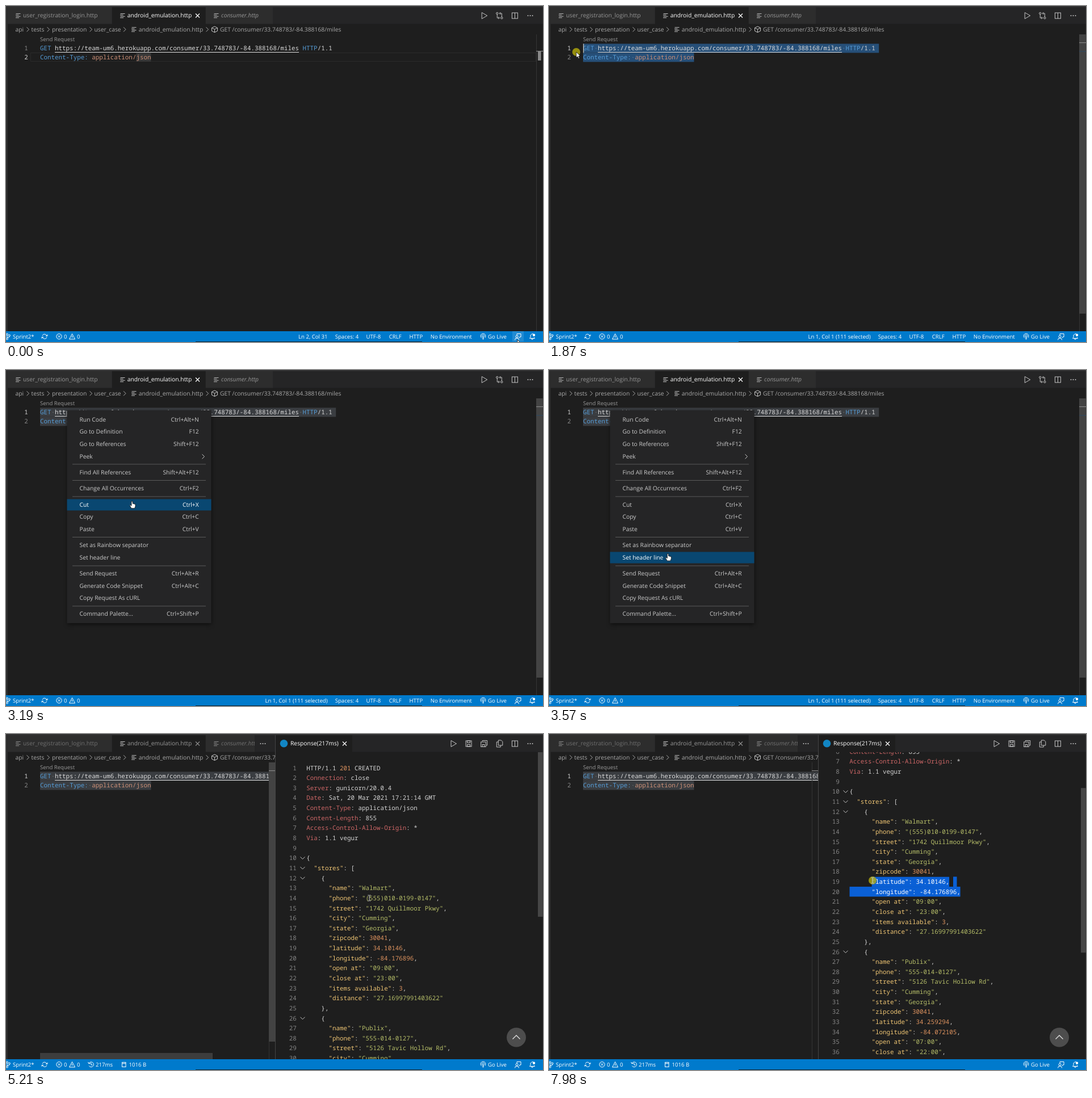
Animation, 946 px wide and 592 px high, one loop 8 s. Source, as an HTML page with a canvas:

```html
<!DOCTYPE html>
<html lang="en">
<head>
<meta charset="utf-8">
<title>HTTP request in an editor</title>
<style>
html, body { margin: 0; width: 100%; height: 100%; overflow: hidden; background: #1e1e1e; }
canvas { display: block; width: 946px; height: 592px; }
</style>
</head>
<body>
<canvas id="stage" width="946" height="592"></canvas>
<script>
const ctx = document.getElementById('stage').getContext('2d');
const LOOP = 8000;
const UI = '"Open Sans", "Noto Sans", sans-serif';
const MONO = '"Noto Sans Mono", "DejaVu Sans Mono", monospace';
const CW = 6.515, ROW = 17.64, CODE_X = 60, RESP_X = 529.3;
const DRAG = 1200, MENU = 2650, CLOSE = 3960, SPLIT = 4110, DONE = 4350, BODY = 4500, DRAG2 = 7150;

// pointer path: time, x, y
const PATH = [
  [0, 901, 588], [70, 901, 588], [250, 824, 536], [450, 676, 422], [650, 400, 205], [860, 96, 92],
  [1150, 262, 92], [1200, 262, 92], [1700, 78, 89], [1790, 56, 81], [1870, 48, 81], [2200, 48, 81],
  [2600, 108, 72], [2900, 108, 72], [3190, 222, 231], [3700, 205, 355], [3970, 205, 355],
  [4190, 335, 321], [4350, 416, 294], [4680, 418, 294], [5100, 640, 289], [5250, 640, 289],
  [5530, 640, 238], [6080, 638, 174], [6400, 624, 157], [6480, 625, 156], [6720, 683, 156],
  [6870, 683, 160], [7110, 727, 278], [7150, 727, 278], [7420, 650, 277], [7660, 600, 259],
  [7940, 570, 258], [8000, 570, 258]
];

const REQUEST = [
  [['GET', '#569cd6'], [' ', ''],
   ['https://team-um6.herokuapp.com/consumer/33.748783/-84.388168/miles', '#dcdcdc'],
   [' ', ''], ['HTTP', '#569cd6'], ['/1.1', '#d4d4d4']],
  [['Content-Type:', '#569cd6'], [' ', ''], ['application/json', '#ce9178']]
];
const LENGTHS = [79, 30];

const RESPONSE = `HTTP/1.1 201 CREATED
Connection: close
Server: gunicorn/20.0.4
Date: Sat, 20 Mar 2021 17:21:14 GMT
Content-Type: application/json
Content-Length: 855
Access-Control-Allow-Origin: *
Via: 1.1 vegur

{
  "stores": [
    {
      "name": "Walmart",
      "phone": "(555)010-0199-0147",
      "street": "1742 Quillmoor Pkwy",
      "city": "Cumming",
      "state": "Georgia",
      "zipcode": 30041,
      "latitude": 34.10146,
      "longitude": -84.176896,
      "open at": "09:00",
      "close at": "23:00",
      "items available": 3,
      "distance": "27.16997991403622"
    },
    {
      "name": "Publix",
      "phone": "555-014-0127",
      "street": "5126 Tavic Hollow Rd",
      "city": "Cumming",
      "state": "Georgia",
      "zipcode": 30041,
      "latitude": 34.259294,
      "longitude": -84.072105,
      "open at": "07:00",
      "close at": "22:00",`.split('\n');

const MENU_ITEMS = [
  [88, 'Run Code', 'Ctrl+Alt+N'], [109, 'Go to Definition', 'F12'], [131, 'Go to References', 'Shift+F12'],
  [153, 'Peek', ''], [181, 'Find All References', 'Shift+Alt+F12'], [209, 'Change All Occurrences', 'Ctrl+F2'],
  [238, 'Cut', 'Ctrl+X'], [259, 'Copy', 'Ctrl+C'], [281, 'Paste', 'Ctrl+V'],
  [309, 'Set as Rainbow separator', ''], [331, 'Set header line', ''],
  [359, 'Send Request', 'Ctrl+Alt+R'], [381, 'Generate Code Snippet', 'Ctrl+Alt+C'],
  [402, 'Copy Request As cURL', ''], [430, 'Command Palette...', 'Ctrl+Shift+P']
];
const MENU_RULES = [166, 194.5, 223, 294.5, 345, 416];

const clamp = (v, a = 0, b = 1) => Math.min(b, Math.max(a, v));
const ease = v => { v = clamp(v); return v * v * (3 - 2 * v); };

function rect(x, y, w, h, color) {
  ctx.fillStyle = color;
  ctx.fillRect(x, y, w, h);
}

// y is the middle of the capitals
function text(s, x, y, color, { size = 10.3, font = UI, align = 'left', style = '' } = {}) {
  ctx.font = `${style} ${size}px ${font}`;
  ctx.textAlign = align;
  ctx.fillStyle = color;
  ctx.fillText(s, x, y + size * 0.357);
}
const mono = (s, x, y, color, align) => text(s, x, y, color, { size: 10.86, font: MONO, align });

function line(points, color, width = 1, close = false) {
  ctx.beginPath();
  points.forEach(([x, y]) => ctx.lineTo(x, y));
  if (close) ctx.closePath();
  ctx.strokeStyle = color;
  ctx.lineWidth = width;
  ctx.stroke();
}

function disc(x, y, r, color) {
  ctx.beginPath();
  ctx.arc(x, y, r, 0, 7);
  ctx.fillStyle = color;
  ctx.fill();
}

function ring(x, y, r, color, from = 0, to = Math.PI * 2, width = 1) {
  ctx.beginPath();
  ctx.arc(x, y, r, from, to);
  ctx.strokeStyle = color;
  ctx.lineWidth = width;
  ctx.stroke();
}

function box(x, y, w, h, color) {
  ctx.strokeStyle = color;
  ctx.lineWidth = 1;
  ctx.strokeRect(x, y, w, h);
}

function clipped(x, y, w, h, draw) {
  ctx.save();
  ctx.beginPath();
  ctx.rect(x, y, w, h);
  ctx.clip();
  draw();
  ctx.restore();
}

const chevron = (x, y, color) => line([[x - 2, y - 4], [x + 2, y], [x - 2, y + 4]], color);
const fold = (x, y, color, s = 4) => line([[x - s, y - s / 2], [x, y + s / 2], [x + s, y - s / 2]], color);
const cross = (x, y, color) => {
  line([[x - 3.5, y - 3.5], [x + 3.5, y + 3.5]], color, 1.2);
  line([[x + 3.5, y - 3.5], [x - 3.5, y + 3.5]], color, 1.2);
};
const dots = (x, y) => [-4, 0, 4].forEach(d => disc(x + d, y, 1, '#c5c5c5'));
const fileIcon = (x, y, color) => [8, 5.5, 8, 6].forEach((w, i) => rect(x + (i % 2 ? 0 : .5), y - 4 + i * 2.4, w, 1, color));

const ICON = '#c5c5c5';
const tools = {
  play: x => line([[x - 4, 11.5], [x + 5.5, 17], [x - 4, 22.5]], ICON, 1, true),
  split: x => { box(x - 5, 12, 10, 10, ICON); line([[x, 12], [x, 22]], ICON); },
  more: x => dots(x, 17),
  compare: x => {
    ring(x - 4, 13, 1.7, ICON);
    ring(x + 4, 21, 1.7, ICON);
    line([[x - 4, 15], [x - 4, 21], [x, 21]], ICON);
    line([[x - 2, 19], [x, 21], [x - 2, 23]], ICON);
    line([[x + 4, 19], [x + 4, 13], [x, 13]], ICON);
    line([[x + 2, 11], [x, 13], [x + 2, 15]], ICON);
  },
  save: x => { box(x - 5, 12, 10, 10, ICON); box(x - 2.5, 12, 5, 3.5, ICON); box(x - 2.5, 18.5, 5, 3.5, ICON); },
  saveAll: x => {
    line([[x - 3, 13], [x - 3, 11.5], [x + 5.5, 11.5], [x + 5.5, 20], [x + 4, 20]], ICON);
    box(x - 5.5, 14, 8.5, 8.5, ICON);
    box(x - 3, 18.5, 3.5, 4, ICON);
  },
  copy: x => {
    line([[x - 2, 11], [x + 3, 11], [x + 5.5, 13.5], [x + 5.5, 20], [x - 2, 20]], ICON, 1, true);
    line([[x - 2, 14], [x - 5, 14], [x - 5, 23], [x + 2, 23], [x + 2, 20]], ICON);
  }
};

function pointer(t) {
  const i = PATH.findIndex(p => p[0] > t);
  if (i < 0) return PATH[PATH.length - 1].slice(1);
  const [t0, x0, y0] = PATH[i - 1], [t1, x1, y1] = PATH[i];
  const k = (t - t0) / (t1 - t0);
  return [x0 + (x1 - x0) * k, y0 + (y1 - y0) * k];
}

// caret of the request editor; everything from it to the end is selected
function requestCaret(t) {
  if (t < DRAG) return { row: 1, col: 30 };
  const [x, y] = pointer(Math.min(t, 1870));
  const row = y < 82.5 ? 0 : 1;
  return { row, col: clamp(Math.round((x - CODE_X) / CW), 0, LENGTHS[row]) };
}
const selectedCount = ({ row, col }) => row ? 30 - col : 111 - col;

function tabs(split) {
  rect(3, 2, 943, 29.5, '#252526');
  clipped(3, 2, split ? 435 : 943, 30, () => {
    rect(3, 2, 183.5, 29.5, '#2d2d2d');
    rect(187, 2, 164.5, 29.5, '#1e1e1e');
    rect(352, 2, 118, 29.5, '#2d2d2d');
    const dim = split ? '#707070' : '#969696', lit = split ? '#989898' : '#ffffff';
    fileIcon(17, 17, split ? '#8a8a8a' : '#b5b5b5');
    text('user_registration_login.http', 30, 16.7, dim);
    fileIcon(201, 17, '#c5c5c5');
    text('android_emulation.http', 213.7, 16.7, lit);
    cross(337.5, 17, split ? '#8a8a8a' : '#ffffff');
    fileIcon(366, 17, split ? '#8a8a8a' : '#b5b5b5');
    text('consumer.http', 379, 16.7, dim, { style: 'italic' });
  });
}

function breadcrumbs() {
  const c = '#a9a9a9', y = 41.3;
  [['api', 16.5], ['tests', 44.5], ['presentation', 81], ['user_case', 155.5], ['android_emulation.http', 233.7],
   ['GET /consumer/33.748783/-84.388168/miles', 377]].forEach(([s, x]) => text(s, x, y, c));
  [38.5, 74.5, 149.5, 209, 354.5].forEach(x => chevron(x, y, c));
  fileIcon(221, y, '#c5c5c5');
  line([[367.5, 36], [372.5, 38.5], [372.5, 44], [367.5, 46.5], [362.5, 44], [362.5, 38.5]], '#c5c5c5', 1, true);
  line([[362.5, 38.5], [367.5, 41], [372.5, 38.5]], '#c5c5c5');
  line([[367.5, 41], [367.5, 46.5]], '#c5c5c5');
}

function request(t, caret, split) {
  const chosen = selectedCount(caret) > 0;
  const focused = t < MENU || (t >= CLOSE && t < SPLIT);
  text('Send Request', 60, 59, '#999999', { size: 9.55 });
  if (!chosen) {
    box(43.5, 82.5, 890, 15, '#2a2a2a');
    rect(CODE_X + 26 * CW, 82.5, 4 * CW, 15.5, '#373737');
  }
  const fill = focused ? '#264f78' : '#3a3d41';
  REQUEST.forEach((parts, row) => {
    const y = 74.5 + row * 16;
    const from = row === caret.row ? caret.col : row > caret.row ? 0 : -1;
    if (chosen && from >= 0)
      rect(CODE_X + from * CW, y - 8, (LENGTHS[row] - from + (row ? 0 : 1)) * CW, 16, fill);
    mono(String(row + 1), 38.7, y, row === caret.row ? '#d0d0d0' : '#858585', 'right');
    let col = 0;
    parts.forEach(([s, color]) => {
      const x = CODE_X + col * CW;
      if (s === ' ') {
        if (chosen && from >= 0 && col >= from) disc(x + CW / 2, y, .7, 'rgba(227,228,226,.35)');
      } else mono(s, x, y, color);
      if (s.startsWith('https')) rect(x, 81, s.length * CW, 1, color);
      col += s.length;
    });
  });
  if (t >= DRAG && t < 2300) rect(CODE_X + caret.col * CW, 66.5 + caret.row * 16, 1.5, 16, '#aeafad');

  // scrollbars and overview ruler
  const x = split ? 463 : 934;
  rect(x, 50, 1, 523, '#343434');
  const shown = clamp((t - 130) / 120) * (1 - ease((t - 5300) / 600));
  ctx.globalAlpha = shown;
  rect(x, 50, 11.5, 492, '#434343');
  if (t > 4260) rect(60, 562, 304, 11, '#3d3d3d');
  ctx.globalAlpha = 1;
  rect(x, caret.row ? 79 : 64, 12, 1.2, '#858585');
  if (!chosen) rect(937, 80, 5.5, 16, '#888888');
  else if (!split) rect(x, 79.5, 12, 1, '#2b4a68');
}

function tokens(s, i) {
  if (i === 0) return [['HTTP/1.1 ', '#d4d4d4'], ['201', '#de935f'], [' CREATED', '#d4d4d4']];
  if (i < 8) {
    const k = s.indexOf(':');
    return [[s.slice(0, k), '#cc6666'], [s.slice(k), '#d4d4d4']];
  }
  return (s.match(/"[^"]*":?|-?\d[\d.]*|[^"\d-]+/g) || []).flatMap(p => {
    if (p.endsWith('":')) return [[p.slice(0, -1), '#f0c674'], [':', '#d4d4d4']];
    return [[p, p[0] === '"' ? '#b5bd68' : /\d/.test(p) ? '#de935f' : '#d4d4d4']];
  });
}

function responseSelection(t, i) {
  if (t < DRAG2 || (i !== 18 && i !== 19)) return null;
  const [x, y] = pointer(t), up = y < 269, len = RESPONSE[i].length;
  const col = clamp(Math.round((x - RESP_X) / CW), 0, len);
  if (i === 18) return up ? [col, len] : null;
  return [up ? 0 : col, len];
}

function response(t) {
  const scroll = 117 * ease((t - 5250) / 260);
  clipped(475, 32, 471, 541, () => {
    RESPONSE.forEach((s, i) => {
      const y = 59.7 + i * ROW - scroll;
      mono(String(i + 1), 511.7, y, '#858585', 'right');
      if ([9, 10, 11, 25].includes(i)) fold(522.5, y, '#c5c5c5');
      let col = 0;
      tokens(s, i).forEach(([p, color]) => {
        mono(p, RESP_X + col * CW, y, color);
        col += p.length;
      });
      const sel = responseSelection(t, i);
      if (!sel || sel[0] >= sel[1]) return;
      const x = RESP_X + sel[0] * CW, w = (sel[1] - sel[0]) * CW;
      clipped(x, y - 8.8, w, ROW, () => {
        rect(x, y - 8.8, w, ROW, '#0a60d6');
        mono(s, RESP_X, y, '#ffffff');
      });
      if (i === 18) rect(712, y - 8.8, 6.5, ROW, '#0a60d6');
    });
    rect(937, 32 + scroll * .54, 8.5, 290, '#464646');
    disc(899, 534.5, 17, '#4d4d4d');
    line([[892.5, 537.5], [899, 531], [905.5, 537.5]], '#e0e0e0', 1.3);
  });
}

function rightPane(t) {
  rect(475, 32, 471, 541, '#1e1e1e');
  rect(475, 2, 135, 30, '#1e1e1e');
  rect(474, 2, 1, 571, '#444444');
  disc(489.5, 16.7, 6.8, '#1286c4');
  text('Response(217ms)', 501, 16.7, '#ffffff');
  cross(596.5, 17, '#ffffff');
  dots(452.5, 17);
  if (t >= BODY) response(t);
}

function toolbar(t) {
  const set = t < SPLIT ? ['play', 'compare', 'split', 'more']
    : t < DONE ? ['play', 'split', 'more']
    : ['play', 'save', 'saveAll', 'copy', 'split', 'more'];
  set.forEach((name, i) => tools[name](923.5 - (set.length - 1 - i) * 27.1));
}

function syncIcon(x, y) {
  ring(x, y, 4, '#fff', .3, 2.9);
  ring(x, y, 4, '#fff', 3.45, 6.05);
  line([[x + 2, y - 1], [x + 5, y - 1], [x + 5, y - 3.5]], '#fff');
  line([[x - 2, y + 1], [x - 5, y + 1], [x - 5, y + 3.5]], '#fff');
}

function statusBar(t, caret) {
  rect(0, 573, 946, 19, '#007acc');
  rect(334, 591, 399, 1, '#0a2436');
  const y = 582.5, label = (s, x, align) => text(s, x, y, '#ffffff', { size: 9.6, align });
  ring(2, 578.5, 1.5, '#fff');
  ring(2, 586.5, 1.5, '#fff');
  ring(6, 580.5, 1.5, '#fff');
  line([[2, 580], [2, 585]], '#fff');
  line([[6, 582], [5, 584], [2, 584]], '#fff');
  label('Sprint2*', 12, 'left');
  syncIcon(68, 582.3);
  ring(93.5, 582.3, 4.7, '#fff');
  line([[91.5, 580.3], [95.5, 584.3]], '#fff');
  line([[95.5, 580.3], [91.5, 584.3]], '#fff');
  label('0', 102);
  line([[116.5, 577.5], [121.5, 587], [111.5, 587]], '#fff', 1, true);
  line([[116.5, 581], [116.5, 584.5]], '#fff');
  label('0', 125);

  if (t >= DONE) {
    ring(150, 582.3, 4.4, '#fff', -2.6, 2.6);
    line([[144.5, 578], [146, 581], [149, 580]], '#fff');
    line([[150, 579.5], [150, 583], [152.5, 583]], '#fff');
    label('217ms', 158);
    box(204.5, 578.5, 6.5, 8, '#fff');
    line([[204.5, 580.5], [211, 580.5]], '#fff');
    label('1016 B', 216.5);
  } else if (t >= CLOSE) {
    syncIcon(149.5, 582.3);
    label('Waiting...', 158);
  }
  if (t < SPLIT) {
    const n = selectedCount(caret);
    label(`Ln ${caret.row + 1}, Col ${caret.col + 1}${n ? ` (${n} selected)` : ''}`, 566.5, 'right');
    label('Spaces: 4', 579.7);
    label('UTF-8', 634.5);
    label('CRLF', 674.7);
    label('HTTP', 710.5);
  }
  if (t < DONE) label('No Environment', 747.7);
  ring(840.5, 581.5, 4.3, '#fff', 2.3, 7.1);
  ring(840.5, 581.5, 2, '#fff', 2.3, 7.1);
  line([[840.5, 582], [840.5, 587.5]], '#fff', 1.5);
  label('Go Live', 849);

  if (t < 100) rect(892, 573, 20, 18, 'rgba(255,255,255,.13)');
  line([[900, 580], [900, 577.5], [907, 577.5], [907, 583], [905, 583], [904, 585]], '#fff');
  ring(900, 582.5, 2, '#fff');
  ring(900, 588.5, 3.5, '#fff', Math.PI, Math.PI * 2);
  line([[922.5, 585.5], [924, 583.5], [924, 580], [927, 577.5], [929, 578]], '#fff');
  line([[922.5, 585.5], [931.5, 585.5], [930, 583.5]], '#fff');
  disc(930, 579.8, 2.2, '#fff');
  ring(927, 586, 1.5, '#fff', 0, Math.PI);
}

function menu(t) {
  const [, py] = pointer(t);
  ctx.save();
  ctx.shadowColor = 'rgba(0,0,0,.6)';
  ctx.shadowBlur = 7;
  ctx.shadowOffsetY = 2;
  rect(107.5, 71, 254, 375, '#252526');
  ctx.restore();
  MENU_ITEMS.forEach(([y, name, keys]) => {
    const hot = t > 2900 && Math.abs(py - y) < 10.7;
    if (hot) rect(107.5, y - 10.5, 254, 20, '#094771');
    const color = hot ? '#ffffff' : '#cccccc';
    text(name, 129.5, y - .2, color);
    text(keys, 339.7, y - .2, color, { align: 'right' });
  });
  chevron(347.5, 152.5, '#cccccc');
  MENU_RULES.forEach(y => rect(117, y - .5, 235, 1, '#5a5a5a'));
}

function shape(points, x, y) {
  ctx.beginPath();
  points.forEach(([px, py]) => ctx.lineTo(x + px, y + py));
  ctx.closePath();
  ctx.fillStyle = '#ffffff';
  ctx.strokeStyle = '#111111';
  ctx.lineWidth = .8;
  ctx.fill();
  ctx.stroke();
}

function mouse(t) {
  const [x, y] = pointer(t);
  const pressed = (t >= DRAG && t < 2060) || (t >= 2580 && t < MENU) || (t >= 3790 && t < CLOSE) || t >= DRAG2;
  if (pressed) disc(x, y, 7, 'rgba(184,176,12,.78)');
  if (y > 573 || (t > 1780 && t < 2950)) {
    shape([[0, 0], [0, 10], [2.3, 8], [4, 11.5], [5.6, 10.7], [4, 7.3], [7, 7]], x, y);
  } else if (t >= 2950 && t < CLOSE) {
    shape([[-1, 0], [1, 0], [1.3, 4], [6, 5.3], [6, 9], [4.6, 12.5], [-1, 12.5], [-4, 7.5], [-3, 6.5], [-1, 8]], x, y);
  } else {
    const c = '#c8c8c8';
    rect(x - .5, y - 5, 1, 10, c);
    [-5.5, 4.5].forEach(d => { rect(x - 2.5, y + d, 2, 1, c); rect(x + .5, y + d, 2, 1, c); });
  }
}

function draw(t) {
  const split = t >= SPLIT, caret = requestCaret(t);
  ctx.textRendering = 'geometricPrecision';
  rect(0, 0, 946, 592, '#1e1e1e');
  rect(0, 0, 3, 573, '#2c2c2c');
  rect(0, 0, 946, 2, '#323233');
  tabs(split);
  clipped(3, 31, split ? 471 : 943, 542, () => {
    breadcrumbs();
    request(t, caret, split);
  });
  if (split) rightPane(t);
  toolbar(t);
  statusBar(t, caret);
  if (t >= MENU && t < CLOSE) menu(t);
  mouse(t);
}

function tick() {
  draw(performance.now() % LOOP);
  requestAnimationFrame(tick);
}
tick();
</script>
</body>
</html>
```
